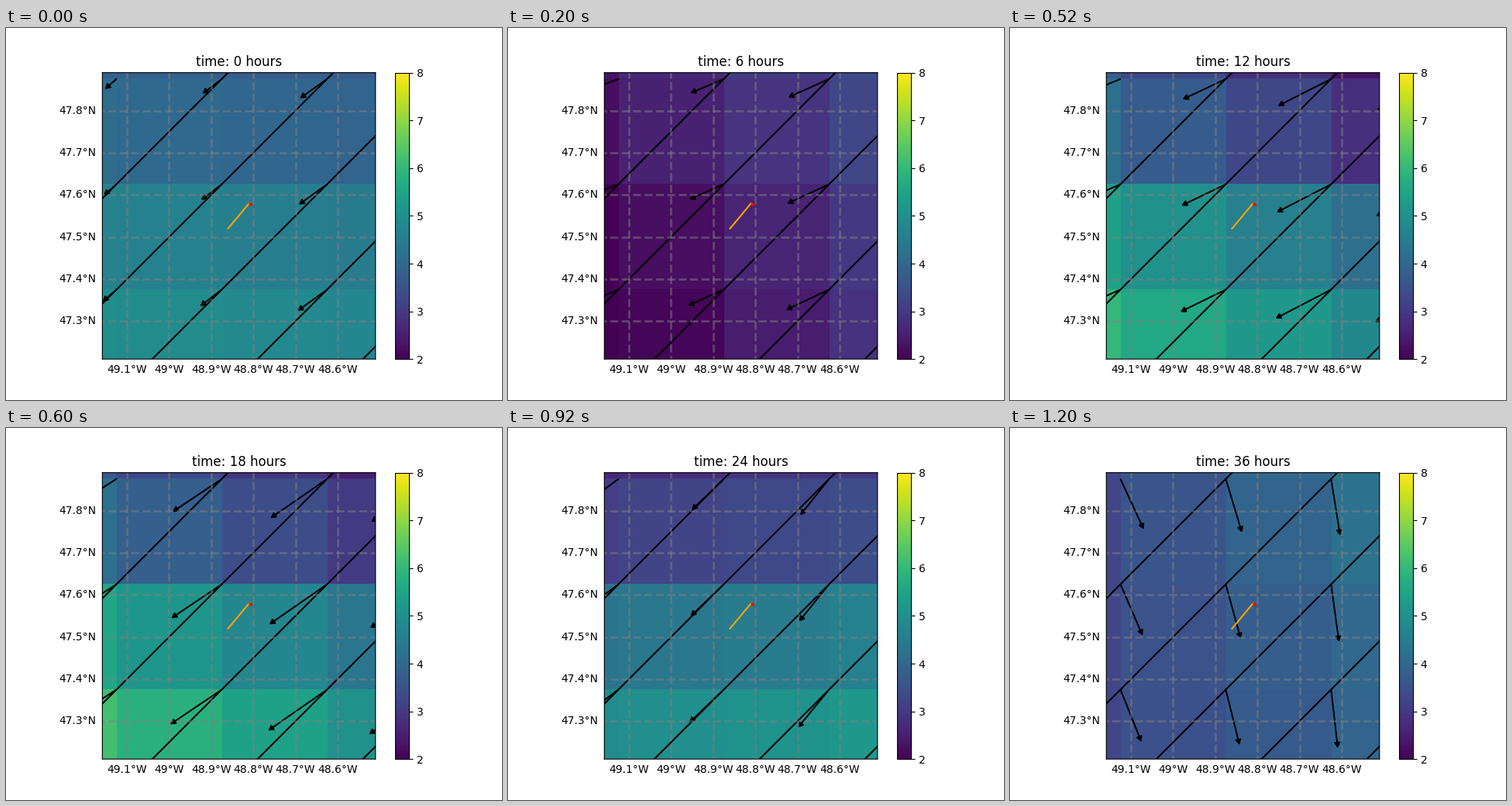
A matplotlib script that plays this animation: 640x480 px, repeating every 1.4 s.

```python
import numpy as np
import matplotlib.pyplot as plt
from matplotlib.animation import FuncAnimation
from matplotlib.patches import FancyArrow

WEST, EAST, SOUTH, NORTH = -49.1585, -48.51, 47.21, 47.89
PX_PER_DEG = 369.6 / (NORTH - SOUTH)
STEP_HOURS = 6

# One entry per time step: field values at the (north-west, north-east,
# south-west, south-east), the middle arrow in pixels (right, down) and its
# change towards the east.
STEPS = [
    ((4.1, 3.9, 4.95, 4.75), (-25.5, 19.5), (-10, 6)),
    ((2.2, 3.25, 1.7, 2.85), (-43.5, 19), (-9.5, 5.5)),
    ((4.2, 2.8, 6.0, 4.8), (-56, 27), (-13, 8.5)),
    ((4.2, 3.0, 6.2, 5.0), (-64, 43), (-9.5, 8)),
    ((3.1, 3.4, 4.87, 5.17), (-42, 40.5), (4, 6.5)),
    ((2.1, 2.45, 3.25, 3.65), (-29.5, 64), (2, 0)),
    ((3.25, 4.25, 3.25, 3.9), (19, 69), (-9, 4)),
]
SOUTH_DRIFT = np.array([-1.5, 1.2])

EASTWARD = np.linspace(0, 1, 4)
SOUTHWARD = np.array([-0.25, 0, 0.68, 1])[:, None]

lons = -49.375 + 0.25 * np.arange(5)
lats = 48.125 - 0.25 * np.arange(5)


def field(corners):
    nw, ne, sw, se = corners
    north = nw + (ne - nw) * EASTWARD
    south = sw + (se - sw) * EASTWARD
    return north + (south - north) * SOUTHWARD


def add_arrow(lon, lat, vector, color="black", head=0.0125):
    dx, dy = np.array(vector) * (1, -1) / PX_PER_DEG
    return ax.add_patch(FancyArrow(
        lon, lat, dx, dy, width=0.001, head_width=head, head_length=0.9 * head,
        length_includes_head=True, color=color, linewidth=1))


fig, ax = plt.subplots(figsize=(6.4, 4.8), dpi=100)
# The small shift makes cell borders round up to the next pixel.
shift = 0.3 / PX_PER_DEG
mesh = ax.pcolormesh(lons + shift, lats + shift, field(STEPS[0][0]),
                     vmin=2, vmax=8)
fig.colorbar(mesh, ax=ax)

for offset in np.arange(95.75, 97, 0.25):
    ends = np.array([-49.5, -48.25])
    ax.plot(ends, ends + offset, color="black")
ax.plot([-48.86, -48.81], [47.52, 47.58], color="orange")
add_arrow(-48.81, 47.58, (3.8, 3), "red", 0.006).set_zorder(2.1)

lon_ticks = np.linspace(-49.1, -48.6, 6)
lat_ticks = np.linspace(47.3, 47.8, 6)
grid_style = dict(colors="gray", linewidth=2, linestyle="--", alpha=0.5)
ax.vlines(lon_ticks, 47.2, 47.9, **grid_style)
ax.hlines(lat_ticks, -49.2, -48.5, **grid_style)

ax.set_xticks(lon_ticks, [f"{-lon:.4g}°W" for lon in lon_ticks])
ax.set_yticks(lat_ticks, [f"{lat:.4g}°N" for lat in lat_ticks], va="center")
ax.tick_params("x", length=0, pad=5)
ax.tick_params("y", length=0, pad=5.6)
ax.set(xlim=(WEST, EAST), ylim=(SOUTH, NORTH), aspect="equal")
for spine in ax.spines.values():
    spine.set_snap(False)
title = ax.set_title("")
arrows = []


def update(step):
    corners, middle, change = STEPS[step]
    mesh.set_array(field(corners))
    title.set_text(f"time: {step * STEP_HOURS} hours")
    while arrows:
        arrows.pop().remove()
    for row, lat in enumerate(lats[1:4], start=-1):
        for lon, col in zip(lons[1:], (-1, 0, 1, 1.6)):
            vector = middle + col * np.array(change) + row * SOUTH_DRIFT
            arrows.append(add_arrow(lon, lat, vector))
    return [mesh, title, *arrows]


animation = FuncAnimation(fig, update, frames=len(STEPS), interval=200,
                          init_func=lambda: update(0), repeat=True,
                          repeat_delay=0)
plt.show()
```
